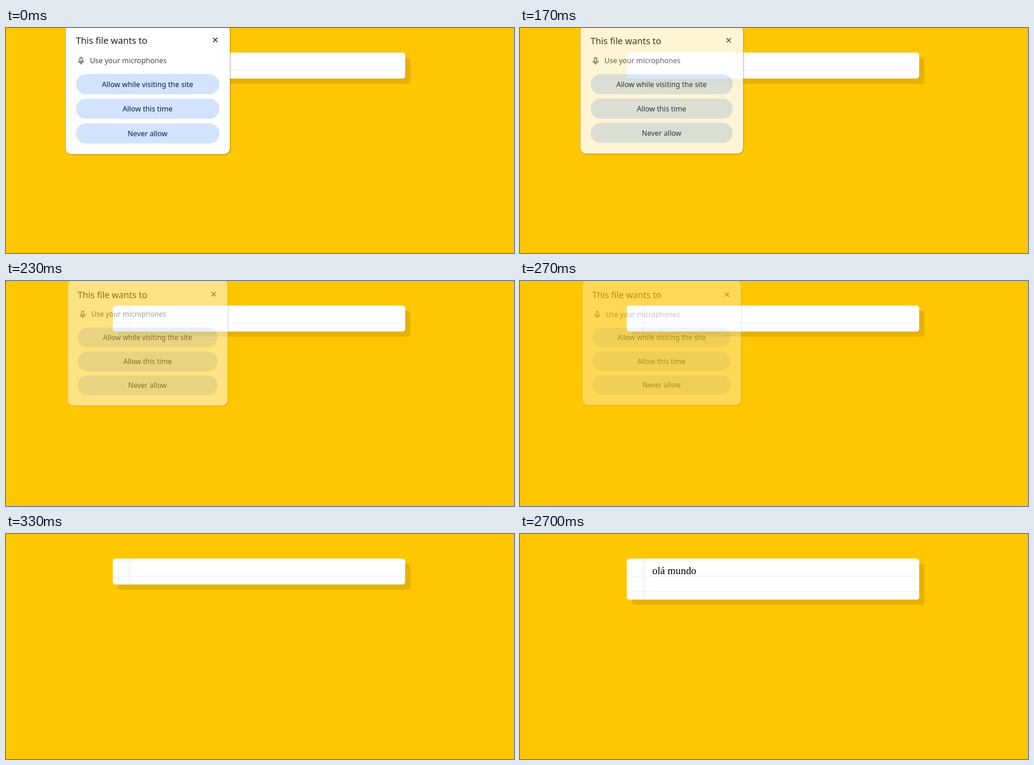
An HTML page that plays this animation: 1123 by 499 pixels, repeating every 5.66 s.

```html
<!DOCTYPE html>
<html lang="en">
<head>
<meta charset="utf-8">
<title>Microphone permission and dictation</title>
<style>
  html, body { margin: 0; width: 100%; height: 100%; overflow: hidden; background: #ffc602; }
  svg { display: block; width: 1123px; height: 499px; }
  #words { font: 22.86px "Liberation Serif", "Times New Roman", serif; }
  #dialog { font: 16px "Noto Sans", sans-serif; }
  .panel { fill: #fff; stroke: rgba(0, 0, 0, .14); filter: drop-shadow(1px 1.5px 1.2px rgba(0, 0, 0, .32)); }
  .title { font-size: 20px; fill: #1f1f1f; }
  .button rect { fill: #d3e3fd; }
  .button text { fill: #041e49; font-weight: 500; text-anchor: middle; }
  .icon { fill: none; stroke: #474747; stroke-width: 1.6; }
</style>
</head>
<body>
<svg viewBox="0 0 1123 499">
  <rect id="shadow" x="247.4" y="66" width="646.4" rx="5.7" fill="#e5b202"/>
  <rect id="card" x="236" y="54.5" width="646.4" rx="5.7" fill="#fff"/>
  <path d="M236 59.5H882.4" stroke="#e0f5f3"/>
  <path d="M236 93.5H882.4" stroke="#e7ebeb"/>
  <path id="lowerRule" d="M236 127.5H882.4" stroke="#e7ebeb"/>
  <rect class="margin" x="270" y="55" width="1" fill="#f4dfe2"/>
  <rect class="margin" x="275" y="55" width="1" fill="#e9e2e2"/>
  <text id="words" x="292.6" y="89"></text>

  <g id="dialog">
    <rect class="panel" x="132" y="-7" width="363" height="287" rx="13"/>
    <text class="title" x="154.6" y="35">This file wants to</text>
    <path class="icon" d="M457.6 21.4l10 10m0-10l-10 10" style="stroke:#1f1f1f"/>
    <g class="icon">
      <rect x="163.4" y="65" width="5" height="10" rx="2.5"/>
      <path d="M160.1 72.2a5.8 5.4 0 0 0 11.6 0M165.9 77.6V81"/>
    </g>
    <text x="185.4" y="78" fill="#474747">Use your microphones</text>
    <g class="button" transform="translate(154.7 102.3)">
      <rect width="317" height="44.8" rx="22.4"/><text x="158.2" y="28.6">Allow while visiting the site</text>
    </g>
    <g class="button" transform="translate(154.7 156.8)">
      <rect width="317" height="44.8" rx="22.4"/><text x="158.2" y="28.6">Allow this time</text>
    </g>
    <g class="button" transform="translate(154.7 211.2)">
      <rect width="317" height="44.8" rx="22.4"/><text x="158.2" y="28.6">Never allow</text>
    </g>
  </g>
</svg>
<script>
  const LOOP = 5660, TICK = 100 / 3;
  const byId = id => document.getElementById(id);
  const [shadow, card, lowerRule, words, dialog] =
    ['shadow', 'card', 'lowerRule', 'words', 'dialog'].map(byId);
  const margins = document.querySelectorAll('.margin');
  const start = performance.now();

  function draw(t) {
    // The dialog fades and shrinks about its centre, 30 steps per second.
    const step = Math.floor((t + 4) / TICK);
    const gone = Math.min(1, Math.max(0, (step - 4) / 6));
    dialog.style.display = gone < 1 ? '' : 'none';
    dialog.setAttribute('opacity', 1 - gone);
    dialog.setAttribute('transform',
      `translate(313.5 136.5) scale(${1 - .05 * gone}) translate(-313.5 -136.5)`);

    // The first recognised word adds a line to the card.
    const heard = t >= 2470;
    const height = heard ? 91 : 57.4;
    for (const part of [card, shadow]) part.setAttribute('height', height);
    for (const line of margins) line.setAttribute('height', height - 1);
    lowerRule.style.display = heard ? '' : 'none';
    words.textContent = t >= 2700 ? 'olá mundo' : heard ? 'Olá' : '';
  }

  function frame() {
    draw((performance.now() - start) % LOOP);
    requestAnimationFrame(frame);
  }
  frame();
</script>
</body>
</html>
```
